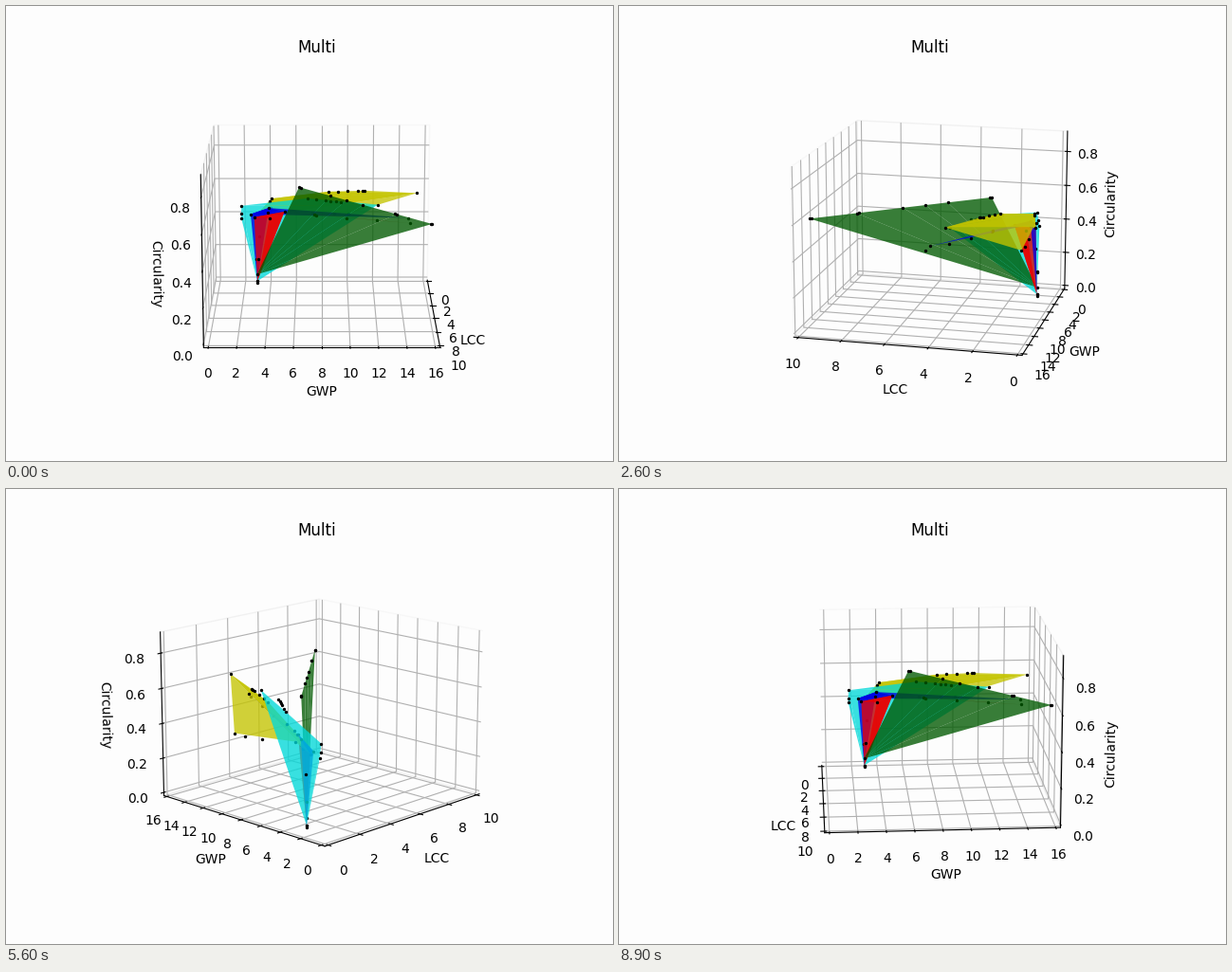
These frames come from a looping animation (640 by 480 pixels, 9000 ms). A matplotlib script:

```python
import matplotlib.pyplot as plt
from matplotlib.animation import FuncAnimation
from mpl_toolkits.mplot3d.art3d import Poly3DCollection

FRAMES = 90
STEP = 4
ALPHA = 0.78

# Points are (LCC, GWP, Circularity)
base = (0.77, 2.96, 0.01)
stem = (0.77, 2.96, 0.052)
hub = (0.89, 2.77, 0.401)
knee = (1.63, 5.13, 0.457)


def between(a, b, *steps):
    return [tuple(p + (q - p) * t for p, q in zip(a, b)) for t in steps]


# green
g_top, g_far = (2.56, 6.28, 0.629), (9.5, 15.7, 0.633)
g_edge = between(g_top, g_far, 0, 0.25, 0.375, 0.5, 0.75, 1)
g_faces = [(stem, p, q) for p, q in zip(g_edge, g_edge[1:])]
g_dots = g_edge + between(g_top, g_far, 0.013, 0.738, 0.992) + [stem]

# yellow
y_far, y_low = (3.42, 15.1, 0.62), (0.66, 10.05, 0.415)
y_a, y_b = (1.85, 8.5, 0.582), (2.46, 11.23, 0.606)
y_1, y_2, y_3 = (0.78, 4.14, 0.509), (0.82, 3.97, 0.494), (0.74, 4.01, 0.454)
y_faces = [(y_far, y_low, y_3, hub), (y_far, y_b, y_a, y_1),
           (y_far, y_1, hub), (y_far, y_a, y_1, hub)]
y_dots = [y_far, y_low, (0.65, 8.94, 0.414), (0.69, 7.23, 0.42),
          y_1, y_2, y_3, hub]
y_dots += between(y_a, y_b, 0, 0.27, 0.54, 0.82, 0.95, 1)

# cyan
c_far = (3.65, 12.2, 0.56)
c_1, c_2, c_3 = (0.95, 1.79, 0.471), (0.89, 1.77, 0.4225), (0.83, 1.77, 0.393)
c_mid = (1.99, 6.91, 0.5465)
c_faces = [(c_1, c_3, base), (c_1, base, c_far), (c_1, c_mid, c_far)]
c_dots = [c_far, c_1, c_2, c_3, c_mid, (2.26, 7.57, 0.549), base,
          (0.77, 2.96, 0), (0.86, 3.16, 0.285)]
c_dots += between((2.6, 8.3, 0.553), (3.08, 9.43, 0.557), 0, 0.33, 0.67, 1)

# blue
b_far, b_top, b_left = (4.19, 14.45, 0.5), (1.02, 3.9, 0.46), (0.92, 2.5, 0.42)
b_faces = [(b_left, b_top, b_far), (b_left, b_top, knee),
           (b_left, knee, hub), (b_left, b_top, base)]
b_dots = [b_far, b_top, b_left, (0.77, 2.9, 0.143), (2.35, 7.4, 0.462)]

# red
r_far, r_mid = (4.39, 14.55, 0.476), (3.69, 12.12, 0.47)
r_low, r_up = (1.2, 3.95, 0.403), (1.0, 3.83, 0.43)
r_faces = [(base, hub, knee), (base, r_low, knee),
           (hub, r_low, knee), (knee, r_far, r_mid)]
r_dots = [r_far, r_mid, (3.03, 9.87, 0.463), (2.37, 7.6, 0.457), knee,
          r_low, r_up, hub, base, (0.75, 3.05, 0.143)]

SOLIDS = [
    (c_faces, c_dots, (0, 0.85, 0.85)),
    (r_faces, r_dots, (0.92, 0, 0)),
    (b_faces, b_dots, (0, 0, 0.9)),
    (y_faces, y_dots, (0.77, 0.77, 0)),
    (g_faces, g_dots, (0, 0.35, 0)),
]

fig = plt.figure(figsize=(6.4, 4.8), dpi=100, facecolor="#fdfdfd")
ax = fig.add_subplot(projection="3d", facecolor="#fdfdfd")
ax.set_title("Multi")
ax.set_xlabel("LCC")
ax.set_ylabel("GWP")
ax.set_zlabel("Circularity")

for faces, dots, color in SOLIDS:
    ax.add_collection3d(Poly3DCollection(
        faces, facecolors=[(*color, ALPHA)] * len(faces), linewidths=0))
    ax.scatter(*zip(*dots), c="k", s=2, depthshade=False)

for set_lim, top in ((ax.set_xlim, 10), (ax.set_ylim, 16), (ax.set_zlim, 0.9)):
    set_lim(-top / 48, top + top / 48)
for axis in (ax.xaxis, ax.yaxis, ax.zaxis):
    axis.pane.fill = False


def update(i):
    ax.view_init(elev=15, azim=STEP * i)
    return []


anim = FuncAnimation(fig, update, frames=FRAMES, interval=100, repeat=True)
plt.show()
```
